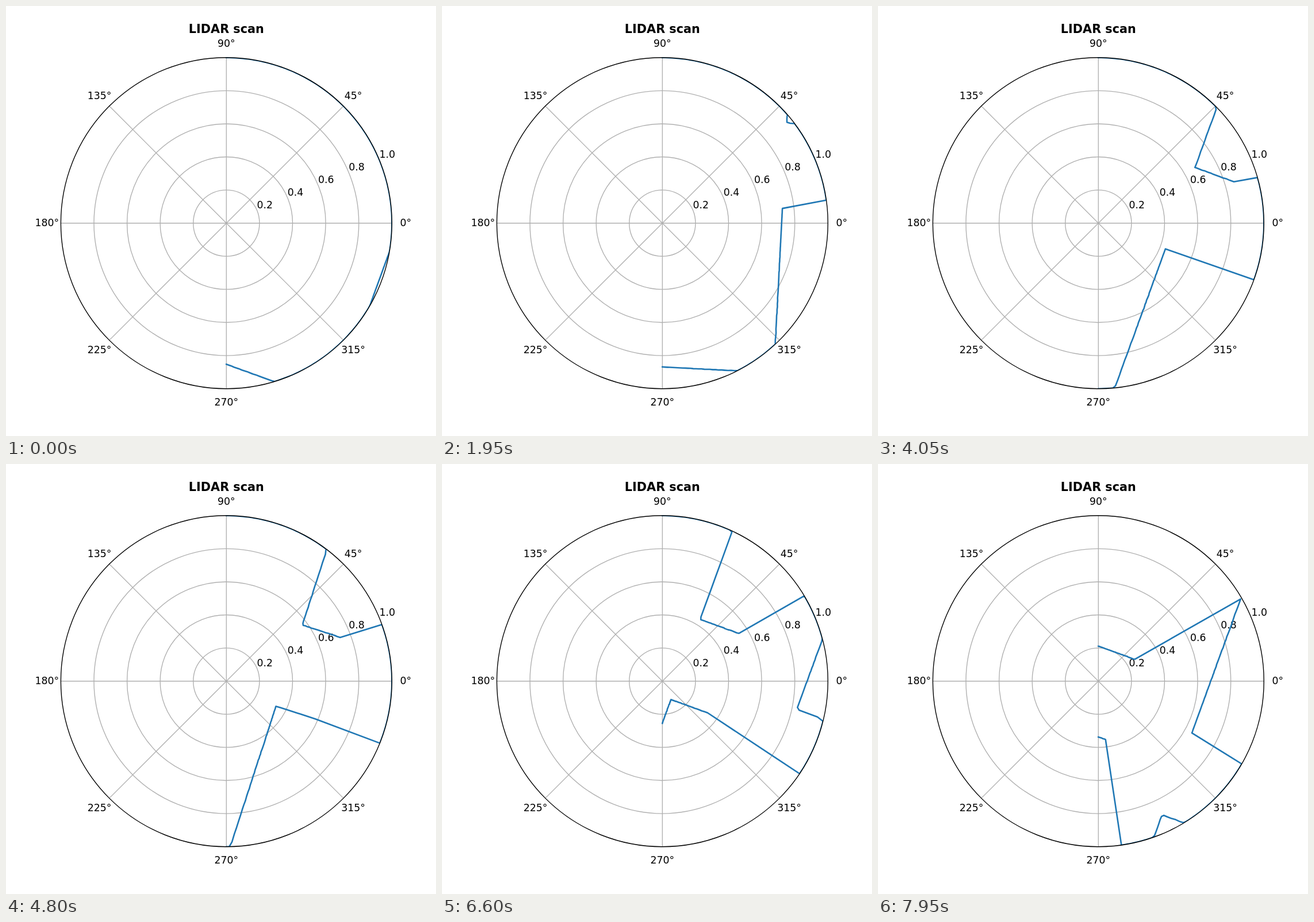
Write an HTML page that moves like this. It is 748 px wide and 748 px high and loops after 8 s.

```html
<!DOCTYPE html>
<html lang="en">
<head>
<meta charset="utf-8">
<title>LIDAR scan</title>
<style>
  html, body { margin: 0; width: 100%; height: 100%; overflow: hidden; background: #fff; }
  svg { display: block; width: 100vw; height: 100vh; }
  text { font: 17.31px "DejaVu Sans", sans-serif; fill: #000; }
  .title { font-size: 20.78px; font-weight: bold; }
  .mid { text-anchor: middle; }
  .grid, .rim { fill: none; stroke: #b0b0b0; stroke-width: 1.385; }
  .rim { stroke: #000; }
  .scan { fill: none; stroke: #1f77b4; stroke-width: 2.6; stroke-linejoin: round; stroke-linecap: square; }
</style>
</head>
<body>
<svg id="stage" viewBox="0 0 748 748"></svg>
<script>
const CX = 383.35, CY = 377.74, R = 287.98;
const REACH = 196, STEP = 150, LOOP = 8000, COUNT = 54;
const RAD = Math.PI / 180;
const stage = document.getElementById('stage');

function add(name, attrs, text, parent = stage) {
  const el = document.createElementNS('http://www.w3.org/2000/svg', name);
  for (const key in attrs) el.setAttribute(key, attrs[key]);
  if (text) el.textContent = text;
  parent.append(el);
  return el;
}

function polar(deg, r) {
  return [CX + r * Math.cos(deg * RAD), CY - r * Math.sin(deg * RAD)];
}

function drawChart() {
  const clip = add('clipPath', { id: 'disc' });
  add('circle', { cx: CX, cy: CY, r: R }, '', clip);
  for (let deg = 0; deg < 360; deg += 45) {
    const [x2, y2] = polar(deg, R);
    add('line', { class: 'grid', x1: CX, y1: CY, x2, y2 });
    const [x, y] = polar(deg, 312.1);
    add('text', { class: 'mid', x, y: y + 5.3 }, deg + '°');
  }
  for (let i = 1; i <= 5; i++) {
    const r = R * i / 5;
    if (i < 5) add('circle', { class: 'grid', cx: CX, cy: CY, r });
    const [x, y] = polar(22.5, r);
    add('text', { x, y: y - 3.8 }, (i / 5).toFixed(1));
  }
  add('text', { class: 'title mid', x: CX, y: 46.5 }, 'LIDAR scan');
}

// Obstacles as [left, top, right, bottom]: two gates and the floor.
const FLOOR = 157;
const gate = (x, top, bottom) => [[x, -600, x + 51, top], [x, bottom, x + 51, FLOOR]];
const walls = [...gate(193, -139, -38), ...gate(337, -78, 23), [-999, FLOOR, 1999, 999]];

// The sensor falls, and each flap throws it up and tilts its nose.
const flaps = [19, 23, 40, 45];
function makePoses() {
  let y = 0, vel = -8, tilt = 42;
  const poses = [];
  for (let i = 0; i < COUNT; i++) {
    if (flaps.includes(i)) {
      vel = -9;
      tilt = 45;
    } else if (i) {
      vel = Math.min(vel + 1, 10);
      tilt -= 3;
    }
    if (i) y += vel;
    poses.push({ x: 4 * i, y, tilt: Math.min(tilt, 20) });
  }
  return poses;
}

// Distance along a ray to a box, or Infinity.
function hit([l, t, r, b], x, y, dx, dy) {
  const x1 = (l - x) / dx, x2 = (r - x) / dx;
  const y1 = (t - y) / dy, y2 = (b - y) / dy;
  const near = Math.max(Math.min(x1, x2), Math.min(y1, y2));
  const far = Math.min(Math.max(x1, x2), Math.max(y1, y2));
  return near <= far && near > 0 ? near : Infinity;
}

function range({ x, y, tilt }, deg) {
  const a = (deg + tilt) * RAD + 1e-9;
  const dx = Math.cos(a), dy = -Math.sin(a);
  const d = Math.min(...walls.map(w => hit(w, x, y, dx, dy)));
  if (d >= REACH) return REACH;
  // Hits land on whole cells, which gives the trace its small kinks.
  return Math.min(REACH, Math.hypot(Math.round(d * dx), Math.round(d * dy)));
}

function trace(pose) {
  const points = [];
  for (let deg = -90; deg <= 90; deg++) {
    const p = polar(deg, range(pose, deg) / REACH * R);
    points.push(p.map(v => v.toFixed(2)).join());
  }
  return points.join(' ');
}

drawChart();
const scan = add('polyline', { class: 'scan', 'clip-path': 'url(#disc)' });
add('circle', { class: 'rim', cx: CX, cy: CY, r: R });

const traces = makePoses().map(trace);
const start = performance.now();
let shown = -1;
function draw(now) {
  const i = Math.floor(Math.max(0, now - start) % LOOP / STEP);
  if (i !== shown) scan.setAttribute('points', traces[shown = i]);
  requestAnimationFrame(draw);
}
draw(start);
</script>
</body>
</html>
```
